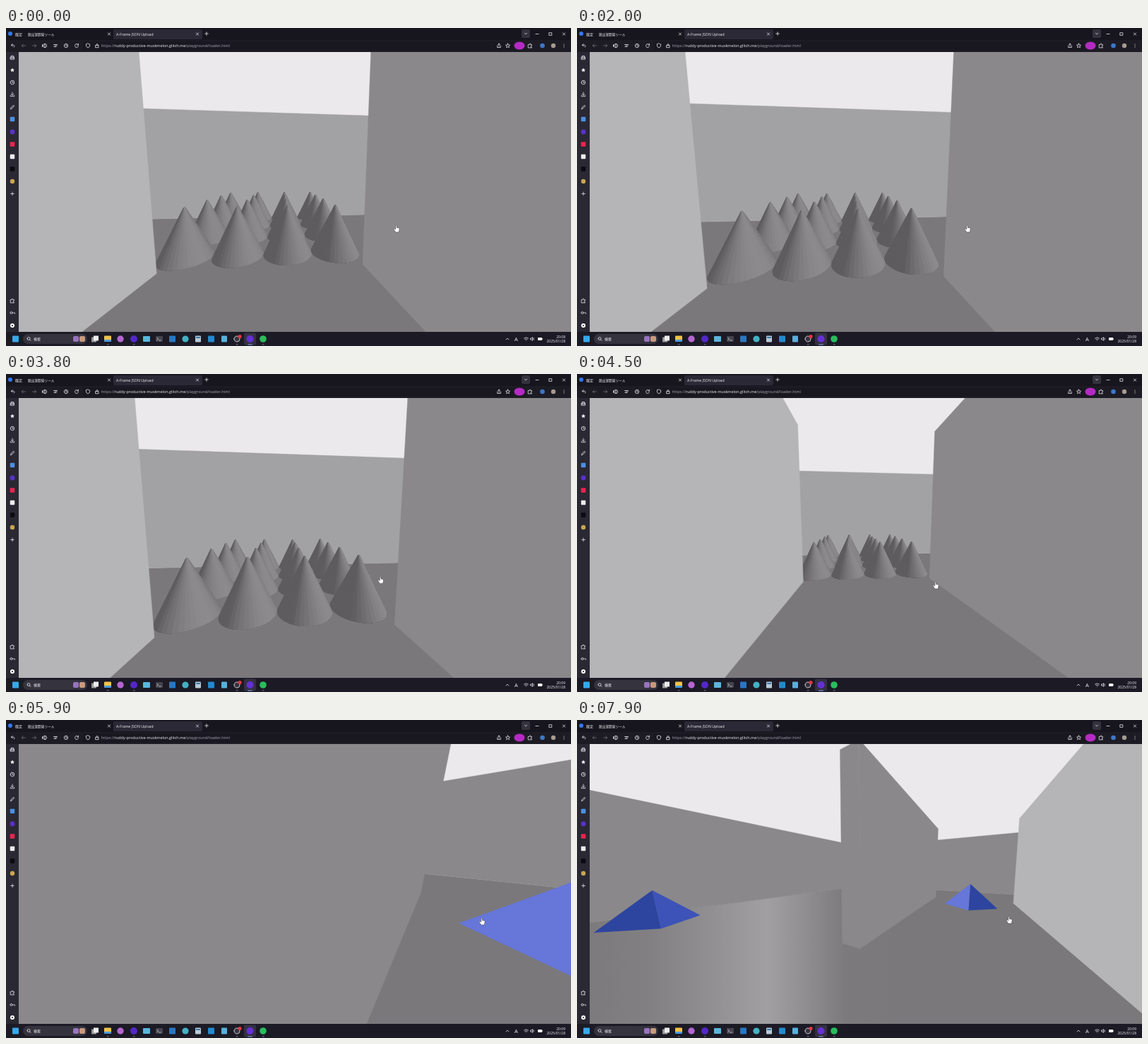
Write an HTML page that moves like this. It is 800x450 px and loops after 8000 ms.

```html
<!DOCTYPE html>
<html lang="ja">
<head>
<meta charset="utf-8">
<title>Corridor walk</title>
<style>
html, body { margin: 0; width: 100%; height: 100%; overflow: hidden; background: #17151d; }
svg { display: block; }
text { font-family: "Open Sans", "Noto Sans CJK JP", "Noto Sans CJK", sans-serif; font-size: 5px; fill: #f4f3f7; }
.line { fill: none; stroke: #e6e4ec; stroke-width: .8; stroke-linecap: round; stroke-linejoin: round; }
.dim { opacity: .4; }
</style>
</head>
<body>
<svg id="stage" width="800" height="450" viewBox="0 0 800 450">
  <defs>
    <linearGradient id="shine" x1="0" x2="440" y1="0" y2="0" gradientUnits="userSpaceOnUse">
      <stop offset="0" stop-color="#7c7a7c"/><stop offset=".2" stop-color="#828082"/>
      <stop offset=".4" stop-color="#929092"/><stop offset=".57" stop-color="#a19fa1"/>
      <stop offset=".68" stop-color="#929092"/><stop offset=".82" stop-color="#7c7a7c"/>
      <stop offset="1" stop-color="#7a787a"/>
    </linearGradient>
  </defs>
  <rect width="800" height="450" fill="#17151d"/>
  <svg x="18" y="34" width="782" height="396" overflow="hidden">
    <rect width="782" height="396" fill="#ebe9eb"/>
    <g id="world"></g>
  </svg>
  <g id="chrome"></g>
  <g id="cursor">
    <path d="M-1.3 1V-4q0-.9.8-.9t.8.9v2.4l3 .7q.9.3.8 1.4l-.5 2.7-.8 1.7h-3.9L-3.7 1.2q-.5-1 .4-1.3.7-.2 1.4.6z" fill="#fff" stroke="#333" stroke-width=".5"/>
  </g>
</svg>
<script>
const LOOP = 8000, FOCAL = 236, EYE = 1.6, NEAR = 0.03, WALL = 4.02;
const HALF = 1.775, OUTER = 2.25, LENGTH = 7.95, SIDE = 9.75, BACK = 3.83, FAR = -11.85;
const FACE = { east: '#b5b4b6', west: '#8a888a', south: '#a2a1a3', north: '#8a888a' };
const byId = id => document.getElementById(id);
const rad = deg => deg * Math.PI / 180;

// time, camera x, camera z, yaw, pitch, pointer x, pointer y
const path = [
  [0, .29, -2.81, 4.8, 5.27, 553, 284],
  [800, .52, -.18, 4.8, 5.27, 553, 284],
  [1000, .52, -.18, 4.8, 5.27, 553, 284],
  [2000, .31, -2.44, 4.8, 5.27, 553, 284],
  [2950, .45, -.18, 4.8, 5.27, 553, 284],
  [3100, .45, -.18, 4.8, 5.27, 553, 284],
  [4500, -.45, -4.52, 4.8, 5.27, 508, 299],
  [5900, 1.53, -1.65, 139.4, 14.8, 674, 285],
  [7900, -.13, 2.7, 146.9, 4.65, 612, 283]
];

function poseAt(t) {
  const next = path.findIndex(key => key[0] > t);
  if (next < 0) return path[path.length - 1];
  const a = path[next - 1], b = path[next];
  const k = (t - a[0]) / (b[0] - a[0]), s = k * k * (3 - 2 * k);
  return a.map((v, i) => v + (b[i] - v) * s);
}

let cam;
function toCamera([x, y, z]) {
  const dx = x - cam.x, dz = z - cam.z, up = y - EYE;
  const fwd = dx * cam.sy + dz * cam.cy;
  return [dx * cam.cy - dz * cam.sy, up * cam.cp + fwd * cam.sp, fwd * cam.cp - up * cam.sp];
}

function polygon(points, fill, extra = '') {
  const view = points.map(toCamera), kept = [];
  view.forEach((a, i) => {
    const b = view[(i + 1) % view.length];
    if (a[2] > NEAR) kept.push(a);
    if ((a[2] > NEAR) !== (b[2] > NEAR)) {
      const k = (NEAR - a[2]) / (b[2] - a[2]);
      kept.push(a.map((v, j) => v + (b[j] - v) * k));
    }
  });
  if (kept.length < 3) return '';
  const pts = kept.map(([x, y, z]) =>
    (391 + FOCAL * x / z).toFixed(1) + ',' + (198 - FOCAL * y / z).toFixed(1)).join(' ');
  return `<polygon points="${pts}" fill="${fill}" ${extra}/>`;
}

function wall(x1, z1, x2, z2, side) {
  const [nx, nz] = { east: [1, 0], west: [-1, 0], south: [0, -1], north: [0, 1] }[side];
  if ((cam.x - x1) * nx + (cam.z - z1) * nz <= 0) return '';
  return polygon([[x1, 0, z1], [x2, 0, z2], [x2, WALL, z2], [x1, WALL, z1]], FACE[side],
    `stroke="${FACE[side]}" stroke-width=".5"`);
}

const block = (x1, x2, z1, z2) =>
  wall(x1, z1, x1, z2, 'west') + wall(x2, z1, x2, z2, 'east') +
  wall(x1, z1, x2, z1, 'south') + wall(x1, z2, x2, z2, 'north');

function pyramid(cx, cz) {
  const fills = ['#6676d9', '#2d459f', '#3e53b8', '#5b6cd2'];
  return fills.map((fill, i) => {
    const a = i * Math.PI / 2, b = a + Math.PI / 2, m = a + Math.PI / 4;
    const facing = (cam.x - cx) * Math.cos(m) + (cam.z - cz) * Math.sin(m) + (EYE - 1) * Math.SQRT1_2;
    if (facing <= 0) return '';
    return polygon([[cx, 1, cz], [cx + Math.cos(a), 0, cz + Math.sin(a)],
      [cx + Math.cos(b), 0, cz + Math.sin(b)]], fill);
  }).join('');
}

// Each shade covers the rest of the cone, so no seams show between them.
function spike(cx, cz) {
  const dx = cam.x - cx, dz = cam.z - cz, dist = Math.hypot(dx, dz);
  const toward = Math.atan2(dz, dx), reach = Math.acos(Math.max(-1, -.3 / dist));
  const slices = 20, step = 2 * reach / slices;
  const ringPoint = (i, r, y) => {
    const a = toward - reach + i * step;
    return [cx + r * Math.cos(a), y, cz + r * Math.sin(a)];
  };
  const rim = Array.from({ length: slices + 1 }, (_, i) => ringPoint(i, .5, 0));
  let out = '';
  for (let i = 0; i < slices; i++) {
    const lit = Math.max(0, Math.cos(toward - reach + (i + .5) * step + rad(34)));
    const v = Math.round(94 + 46 * lit);
    out += polygon([ringPoint(slices, .015, 1), ringPoint(i, .015, 1), ...rim.slice(i)],
      `rgb(${v},${v - 2},${v})`);
  }
  return out;
}

function drawWorld() {
  const floor = [[-SIDE, 0, FAR], [SIDE, 0, FAR], [SIDE, 0, BACK], [-SIDE, 0, BACK]];
  let out = polygon(floor, '#7a787a');
  if (cam.yaw > 90 && cam.z > 0)
    out += polygon(floor, 'url(#shine)', `opacity="${Math.min(1, cam.z / 2.5)}"`);
  out += wall(-SIDE, BACK, SIDE, BACK, 'south') + wall(-SIDE, FAR, SIDE, FAR, 'north') +
    wall(SIDE, FAR, SIDE, BACK, 'west') + wall(-SIDE, FAR, -SIDE, BACK, 'east');
  out += pyramid(8.04, 2.03);
  if (cam.yaw < 90) {
    const spikes = [];
    for (let i = 0; i < 16; i++) spikes.push([-1.59 + 1.005 * (i % 4), .57 + 1.01 * Math.floor(i / 4)]);
    const range = ([x, z]) => Math.hypot(x - cam.x, z - cam.z);
    out += spikes.sort((a, b) => range(b) - range(a)).map(p => spike(...p)).join('');
  }
  out += block(HALF, OUTER, -LENGTH, 0) + block(-OUTER, -HALF, -LENGTH, 0);
  return out + pyramid(.01, -6.05);
}

// Browser frame and taskbar
const rect = (x, y, w, h, fill, r = 0) =>
  `<rect x="${x}" y="${y}" width="${w}" height="${h}" rx="${r}" fill="${fill}"/>`;
const dot = (x, y, r, fill) => `<circle cx="${x}" cy="${y}" r="${r}" fill="${fill}"/>`;
const square = (x, y, s, fill) => rect(x - s / 2, y - s / 2, s, s, fill, 1);
const line = (x, y, d, cls = '') => `<path class="line ${cls}" transform="translate(${x} ${y})" d="${d}"/>`;
const label = (x, y, s, attrs = '') => `<text x="${x}" y="${y}" ${attrs}>${s}</text>`;
const size = px => `style="font-size:${px}px"`;
const ring = r => `M${-r} 0a${r} ${r} 0 1 0 ${2 * r} 0a${r} ${r} 0 1 0 ${-2 * r} 0`;
const CROSS = 'M-1.6-1.6 1.6 1.6M1.6-1.6-1.6 1.6', PLUS = 'M-2.3 0H2.3M0-2.3V2.3';
const STAR = 'M0-3 .9-1 3-.8 1.4.6 1.9 2.7 0 1.6-1.9 2.7-1.4.6-3-.8-.9-1Z';
const PUZZLE = 'M-2.4-1.5h1.6q-.3-1.5.8-1.5t.8 1.5h1.6v1.6q-1.3 0-1.3 1t1.3 1v.8h-4.8Z';
const SHIELD = 'M0-3 2.6-2V0Q2.4 2 0 3-2.4 2-2.6 0V-2Z';
const ARROW = 'M2.7 0H-2.7L-.6-2M-2.7 0-.6 2';
const DOWN = 'M0-3V1M-1.7-.6 0 1.2 1.7-.6M-2.7 1.4V2.7H2.7V1.4';

function drawChrome() {
  let s = rect(0, 0, 800, 17, '#17151d') + rect(0, 17, 800, 17, '#1d1b24') +
    rect(0, 34, 18, 396, '#2a2833') + rect(0, 430, 800, 20, '#1b1a25') +
    rect(152, 2, 126, 14, '#2b2935', 2) + rect(109, 19, 610, 13, '#191720', 2) +
    rect(730, 2, 12, 12, '#34323d', 2);

  s += dot(6, 8, 3, '#3577e8') + label(13, 10.7, '既定') + label(31, 10.7, '脱出室開発ツール', size(4.7)) +
    label(156, 10.7, 'A-Frame JSON Upload', size(5.2)) + line(146, 8.5, CROSS) + line(271, 8.5, CROSS) +
    line(284, 8, PLUS) + line(736, 8, 'M-1.6-.8 0 .8 1.6-.8') + line(752, 8.5, 'M-2 0H2') +
    line(771, 8.5, 'M-1.8-1.8H1.8V1.8H-1.8Z') + line(790, 8.5, CROSS);

  s += line(10, 25, 'M-2.5-.8H1Q3 0 1.5 2M-2.5-.8-.7-2.5M-2.5-.8-.7 1') + line(25, 25, ARROW, 'dim') +
    line(40, 25, 'M-2.7 0H2.7L.6-2M2.7 0 .6 2', 'dim') + line(55, 25, ring(2.6) + 'M0-2.6V2.6M-3.5-1.5V1.5') +
    line(70, 25, 'M-2.5-1.5H2.5M-1 0H2M-2 1.5H1') + line(85, 25, ring(2.7) + 'M0-1.5V.3H1.2') +
    line(100, 25, 'M2-1.5A2.5 2.5 0 1 0 2.5.5M2.5-2.8V-1H.7') + line(116, 25, SHIELD) +
    line(129, 25, 'M-2-.4H2V2.7H-2ZM-1.2-.4V-1.6Q0-3.6 1.2-1.6V-.4') +
    label(135, 27.1, '<tspan fill="#aaa8b2">https://</tspan>ruddy-productive-muskmelon.glitch.me<tspan fill="#aaa8b2">/playground/loader.html</tspan>', size(5.48)) +
    line(698, 25, 'M0 1V-3M-1.5-1.5 0-3 1.5-1.5M-2.3 0V2.5H2.3V0') + line(710.5, 25, STAR) +
    `<ellipse cx="727" cy="25" rx="7.5" ry="5.5" fill="#b52ac4"/>` +
    line(742, 25, PUZZLE) + dot(759.5, 25, 3.3, '#3c78c8') + dot(775, 25, 3.2, '#a79b90') +
    [-2, 0, 2].map(d => dot(790, 25 + d, .6, '#e6e4ec')).join('');

  s += line(9, 42, 'M-2.5-1H2.5V2.3H-2.5ZM-1.5-1V-2.5H1.5V-1M-2.5.6H2.5') +
    `<path transform="translate(9 59.5)" d="${STAR}" fill="#fff"/>` + line(9, 77, ring(2.8) + 'M0-1.6V.3H1.3') +
    line(9, 94, DOWN) + line(9, 112, 'M-2.5 2.5-1.5 0 1.8-2.7 2.7-1.8-.2 1.5Z') +
    square(9, 129, 6.5, '#4b91e1') + dot(9, 147, 3.4, '#5a32c8') + square(9, 164.5, 6.6, '#e9254f') +
    square(9, 182, 6.5, '#eeecef') + square(9, 199.5, 6.5, '#0b0a10') + dot(9, 217, 3.2, '#c9a551') +
    line(9, 234.5, PLUS) + line(9, 386, PUZZLE) + line(7.5, 403, ring(1.5) + 'M1.5 0H5V1.2') +
    dot(9, 421, 3, '#fff') + dot(9, 421, 1.1, '#2a2833');

  s += square(13.5, 440, 9, '#35a9ea') + rect(24, 433, 91, 14, '#34333e', 7) +
    line(32, 439.5, ring(2) + 'M1.5 1.5 3 3') + label(39, 442, '検索') +
    rect(95, 436, 8, 8, '#9973bd', 2) + rect(104, 436, 8, 8, '#c99a7c', 2) +
    rect(121, 437.5, 7, 7, '#999') + rect(124, 435.5, 7, 7, '#eee') +
    rect(139, 435.5, 10, 8, '#f2c448', 1) + rect(139, 441, 10, 3, '#4a9bdd', 1) +
    dot(162, 440, 4.7, '#b565d0') + dot(181, 440, 5, '#5328c6') + rect(194, 436, 10, 8, '#5bb6dc', 1) +
    rect(212, 436, 10, 8, '#45434b', 1) + line(215, 440, 'M-1-1.5 .7 0-1 1.5M2 2H4') +
    square(235.5, 440, 9, '#2877c3') + dot(254, 440, 4.6, '#42b2c4') + rect(268, 435.5, 8, 9, '#b9cad8', 1) +
    rect(269, 437, 6, 2, '#3979ab') + square(290.5, 440, 9, '#2489ce') + rect(305, 435.5, 8, 9, '#57b0dc', 1) +
    dot(327, 440, 4.7, '#35333b') + line(327, 440, ring(4)) + dot(331, 436.5, 2.6, '#e33645') +
    rect(337, 431.5, 17, 17, '#343142', 2) + dot(345.5, 440, 5, '#6530d7') + dot(364, 440, 4.8, '#29bd5c') +
    [144, 181, 327, 364].map(x => rect(x - 1.3, 447.5, 3, .8, '#a3a1aa', .4)).join('') +
    rect(342, 447.5, 7, .9, '#8aa8ea', .4);

  s += line(710, 440, 'M-2 1 0-1 2 1') + label(720, 442.8, 'A', size(7.5)) +
    line(736.5, 440, 'M-3-1Q0-3.6 3-1M-1.7.6Q0-.9 1.7.6M0 2V2.1') +
    line(745, 440, 'M-2-1H-1L.5-2.3V2.3L-1 1H-2ZM2-1.4Q3 0 2 1.4') +
    rect(753, 438, 6, 4, '#eee', .7) + rect(759.2, 439.2, .8, 1.6, '#eee') +
    label(792, 438.5, '20:08', 'id="clock" text-anchor="end"') +
    label(792, 445.3, '2025/01/28', 'text-anchor="end"');
  byId('chrome').innerHTML = s;
}

let shown = -1;
function render(now) {
  const t = Math.floor(now % LOOP / 100) * 100;
  if (t === shown) return;
  shown = t;
  const [, x, z, yaw, pitch, px, py] = poseAt(t);
  cam = { x, z, yaw, sy: Math.sin(rad(yaw)), cy: Math.cos(rad(yaw)),
    sp: Math.sin(rad(pitch)), cp: Math.cos(rad(pitch)) };
  byId('world').innerHTML = drawWorld();
  byId('cursor').setAttribute('transform', `translate(${px} ${py})`);
  byId('clock').textContent = t < 1400 ? '20:08' : '20:09';
}

drawChrome();
const start = performance.now();
function tick() {
  render(performance.now() - start);
  requestAnimationFrame(tick);
}
tick();
</script>
</body>
</html>
```
